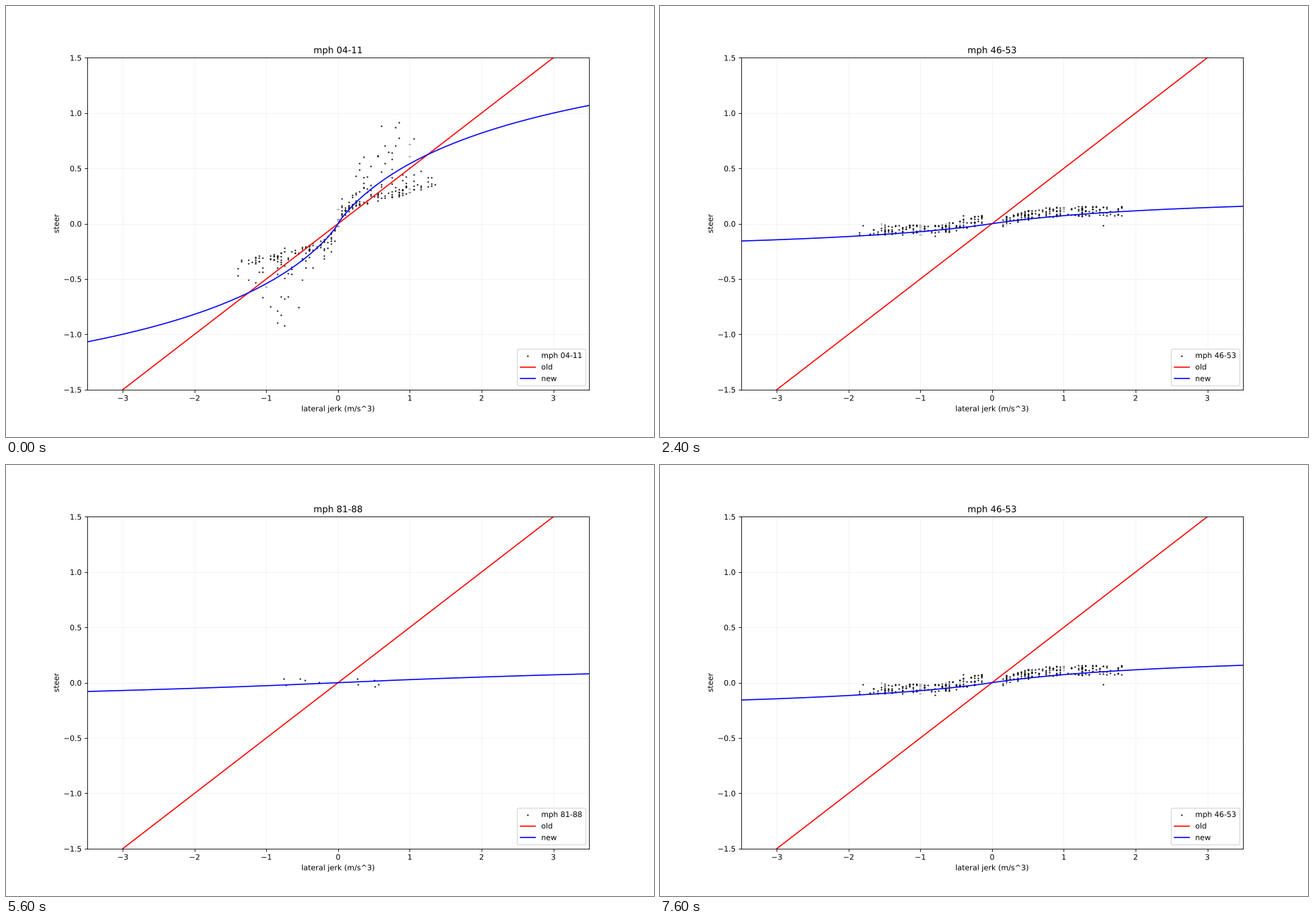
A matplotlib script for the animation above (8000 ms loop, 917x611 px).

```python
import numpy as np
import matplotlib.pyplot as plt
from matplotlib.animation import FuncAnimation
from matplotlib.patheffects import Normal

DPI = 76.4
W, H = 917, 611
BANDS = 13
STEP_MS = 400
ORDER = list(range(BANDS)) + list(range(BANDS - 1, 5, -1))

# key speed bands; every other band is interpolated
KEYS = [0, 2, 6, 9, 10, 12]
RESIST = [1.345, 4.33, 10.4, 22, 27.3, 41]
LIMIT = [.5, 2.17, 3.4, 3.46, 3.2, 2.7]
POWER = [.9, .7, 1, 1, 1, 1]
REACH = [1.45, 1.5, 1.9, 2.5, 1.4, .3]
COUNT = [270, 330, 330, 300, 57, 2]


def key(values, band):
    return np.interp(band, KEYS, values)


def log_key(values, band):
    return np.exp(key(np.log(values), band))


def curve(x, band):
    """Steering curve that rises steeply and then saturates."""
    xp = np.abs(x) ** key(POWER, band)
    return np.sign(x) * xp / (key(LIMIT, band) * xp + log_key(RESIST, band))


def trend(ax_abs, band):
    """Mean steer of the samples at a given size of lateral jerk."""
    dead = (band / 10) ** 3
    width = .15 + .05 * band
    rise = (.15 - .011 * band) * np.tanh((ax_abs - dead) / width)
    return rise + .15 * np.exp(-band) * ax_abs


def samples(band):
    rng = np.random.default_rng(40 + band)
    n = int(log_key(COUNT, band))
    clustered = band >= 7
    step = .0235 * band if clustered else .05
    gap = .02 * band

    # jerk falls into columns, which smear out with distance at high speed
    size = gap + (key(REACH, band) - gap) * rng.beta(1.1, 1.5, n)
    col = np.maximum(np.round(size / step), np.ceil(gap / step))
    size = col * step + clustered * rng.normal(0, .012, n) * col
    sign = rng.choice([-1, 1], n)

    mean = trend(size, band)
    arc = .95 * np.sin(np.pi * np.minimum(size / 1.5, 1))
    fan = np.exp(-2 * band) * np.maximum(arc - mean, .15)
    mean = mean + fan * rng.uniform(0, 1, n) ** 4

    bias = .055 * band * np.exp(-band / 2.5)
    spread = (.03 + .0025 * band) * np.where(rng.random(n) < .04, 3, 1)
    y = bias + sign * mean + spread * rng.uniform(-1, 1, n)
    return np.column_stack([sign * size, y])


def label(band):
    low = 4 + 7 * band
    return f"mph {low:02d}-{low + 7:02d}"


clouds = [samples(b) for b in range(BANDS)]
x = np.linspace(-3.5, 3.5, 701)

plt.rcParams["text.hinting"] = "no_hinting"
fig, ax = plt.subplots(figsize=((W + .01) / DPI, (H + .01) / DPI), dpi=DPI)
dots = ax.scatter([], [], s=1, color="black", label=label(0))
ax.plot(x, x / 2, color="red", label="old")
new_line, = ax.plot(x, curve(x, 0), color="blue", label="new")
ax.set(xlim=(-3.5, 3.5), ylim=(-1.5, 1.5),
       xlabel="lateral jerk (m/s^3)", ylabel="steer")
ax.grid(color="#f2f2f2")
title = ax.set_title(label(0))
legend = ax.legend(loc="lower right", labelspacing=.54, borderpad=.42)

# drawing text as outlines keeps its subpixel position
texts = [title, ax.xaxis.label, ax.yaxis.label, *legend.get_texts(),
         *ax.get_xticklabels(), *ax.get_yticklabels()]
for text in texts:
    text.set_path_effects([Normal()])


def update(i):
    band = ORDER[i]
    dots.set_offsets(clouds[band])
    new_line.set_ydata(curve(x, band))
    title.set_text(label(band))
    legend.get_texts()[0].set_text(label(band))
    return dots, new_line, title, legend


anim = FuncAnimation(fig, update, frames=len(ORDER), interval=STEP_MS,
                     repeat=True, repeat_delay=0, blit=False)
plt.show()
```
